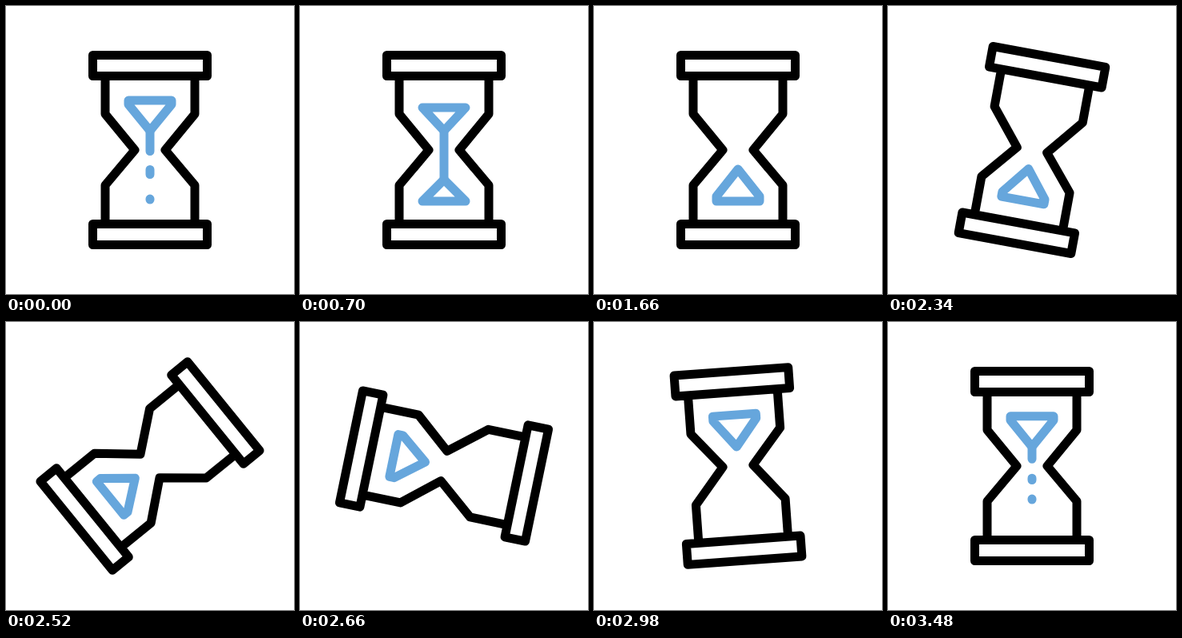
These frames come from a looping animation (360x360 px, 3500 ms). An HTML page:

```html
<!DOCTYPE html>
<html lang="en">
<head>
<meta charset="utf-8">
<title>Hourglass</title>
<style>
  html, body { margin: 0; width: 100%; height: 100%; overflow: hidden; background: #fff; }
  svg { display: block; width: 100vw; height: 100vh; }
  path { fill: none; stroke-width: 11; stroke-linecap: round; stroke-linejoin: round; }
  .glass { stroke: #000; }
  .sand { stroke: #66a6dc; }
</style>
</head>
<body>
<svg viewBox="0 0 360 360">
  <g id="timer">
    <path class="glass" d="M108.5 61.5H251.5V87.5H108.5ZM108.5 272.5H251.5V298.5H108.5Z
      M124 88V135L161 180L124 224V272M236 88V135L199 180L236 224V272"/>
    <path class="sand" id="upper"/>
    <path class="sand" id="lower"/>
    <path class="sand" id="stream"/>
  </g>
</svg>
<script>
  const LOOP = 3500, NECK = 156, FLOOR = 244, GRAVITY = 0.0033;
  const FLOW = -160, HALF = 700, EMPTY = 1530, FULL = 1660;
  const TURN = 2168, TURN_TIME = 926;
  const [timer, upper, lower, stream] =
    ['timer', 'upper', 'lower', 'stream'].map(id => document.getElementById(id));

  const clamp = v => Math.min(1, Math.max(0, v));
  const part = (t, from, to) => clamp((t - from) / (to - from));
  const mix = (a, b, k) => a + (b - a) * k;
  const fall = (t, start, g = GRAVITY) => NECK + g * Math.max(0, t - start) ** 2;
  const line = (a, b) => `M180 ${a}V${b}`;

  // Eases like cubic-bezier(.486, 0, .511, 1)
  function ease(x) {
    let lo = 0, hi = 1;
    for (let i = 0; i < 24; i++) {
      const s = (lo + hi) / 2, r = 1 - s;
      if (1.458 * s * r * r + 1.533 * s * s * r + s ** 3 < x) lo = s; else hi = s;
    }
    return lo * lo * (3 - 2 * lo);
  }

  // Sand heap: base line, shoulders and tip
  const heap = (w, base, shoulder, tip) =>
    `M${180 - w} ${base}H${180 + w}V${shoulder}L180 ${tip}L${180 - w} ${shoulder}Z`;

  function drawUpper(t) {
    if (t >= EMPTY) return '';
    const a = part(t, FLOW, HALF), b = part(t, HALF, EMPTY);
    const base = mix(mix(116, 127, a), NECK, b);
    const shoulder = mix(mix(122, 127, a), NECK, b);
    return heap(mix(27, 0, b), base, shoulder, NECK);
  }

  function drawLower(t, tip) {
    if (t < 10) return '';
    const a = part(t, 10, HALF), b = part(t, HALF, FULL);
    return heap(27 * a, FLOOR, FLOOR - 6 * b, tip);
  }

  function drawStream(t, tip) {
    if (t < FLOW || t >= FULL) return '';
    const head = Math.min(tip, fall(t, -87));
    const tail = fall(t, EMPTY);
    let d = tail < head ? line(tail, head) : '';
    if (t < 100) {
      const mid = Math.min(tip, fall(t, -173, 0.0017));
      const stretch = 3 * part(t, -30, 0);
      const first = Math.min(tip, fall(t, FLOW));
      d += line(mid - stretch, Math.min(tip, mid + stretch + 0.1)) + line(first - 0.5, first + 0.5);
    }
    return d;
  }

  function draw(now) {
    const clock = now % LOOP;
    // After the turn the glass is full again, ahead of the next run
    const t = clock >= TURN + TURN_TIME ? clock - LOOP : clock;
    const tip = mix(mix(FLOOR, 217, part(t, 10, HALF)), 204, part(t, HALF, FULL));
    const angle = t > TURN ? 180 * ease(part(t, TURN, TURN + TURN_TIME)) : 0;
    timer.setAttribute('transform', `rotate(${angle} 180 180)`);
    upper.setAttribute('d', drawUpper(t));
    lower.setAttribute('d', drawLower(t, tip));
    stream.setAttribute('d', drawStream(t, tip));
  }

  const start = performance.now();
  function tick() {
    draw(performance.now() - start);
    requestAnimationFrame(tick);
  }
  draw(0);
  requestAnimationFrame(tick);
</script>
</body>
</html>
```
